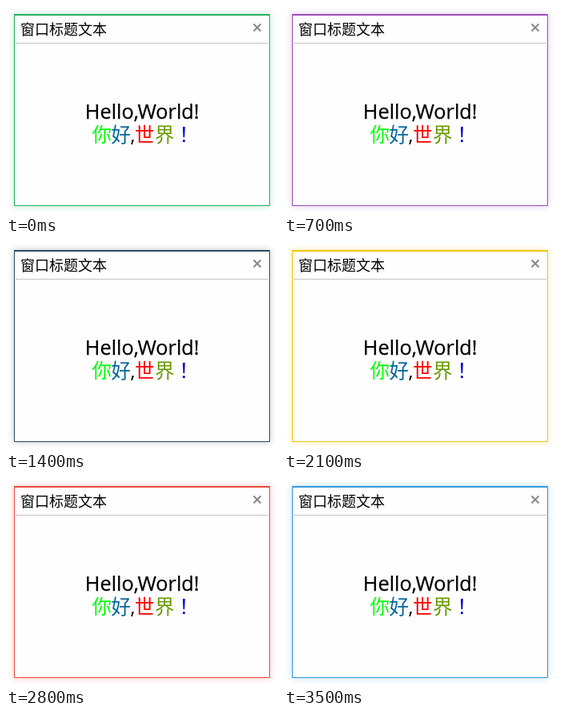
Recreate the animation shown at these times as an HTML page. Size 340 px wide and 260 px high, loop 4.2 s.

```html
<!DOCTYPE html>
<html lang="zh-CN">
<head>
<meta charset="utf-8">
<style>
  html, body { margin: 0; width: 100%; height: 100%; overflow: hidden; background: #fff; }
  #window {
    position: absolute; left: 10px; top: 10px; width: 320px; height: 240px;
    box-sizing: border-box; border: 1px solid; border-top-width: 2px;
    background: #fefefe;
  }
  svg { position: absolute; left: 0; top: 0; }
  text { font-family: "Noto Sans CJK SC", sans-serif; white-space: pre; }
  .latin { font-family: "Open Sans", sans-serif; }
  .greeting { stroke: #000; stroke-width: .25px; }
</style>
</head>
<body>
<div id="window"></div>
<svg width="340" height="260">
  <text x="18" y="35.5" font-size="18">窗口标题文本</text>
  <path d="M309.5 22.5l9 9m0-9l-9 9" stroke="#888" stroke-width="2"/>
  <path d="M12 46.5H328" stroke="#c4c4c4"/>
  <text class="latin greeting" x="98.8" y="141" font-size="25.3">Hello,World!</text>
  <text y="169.5" font-size="24.5">
    <tspan x="107.5" fill="#0f0">你</tspan>
    <tspan x="131.5" fill="#069">好</tspan>
    <tspan x="155.5" class="latin">,</tspan>
    <tspan x="161" fill="#f00">世</tspan>
    <tspan x="186" fill="#690">界</tspan>
    <tspan x="216.3" fill="#00c">！</tspan>
  </text>
</svg>
<script>
const HOLD = 700;
const accents = ["#27ae60", "#9b4fb9", "#34495e", "#f1c40f", "#e74c3c", "#3498db"];
const frame = document.getElementById("window");

function draw(now) {
  const accent = accents[Math.floor(now / HOLD) % accents.length];
  frame.style.borderColor = accent;
  frame.style.boxShadow = `0 0 8px ${accent}55`;
  requestAnimationFrame(draw);
}
draw(performance.now());
</script>
</body>
</html>
```
